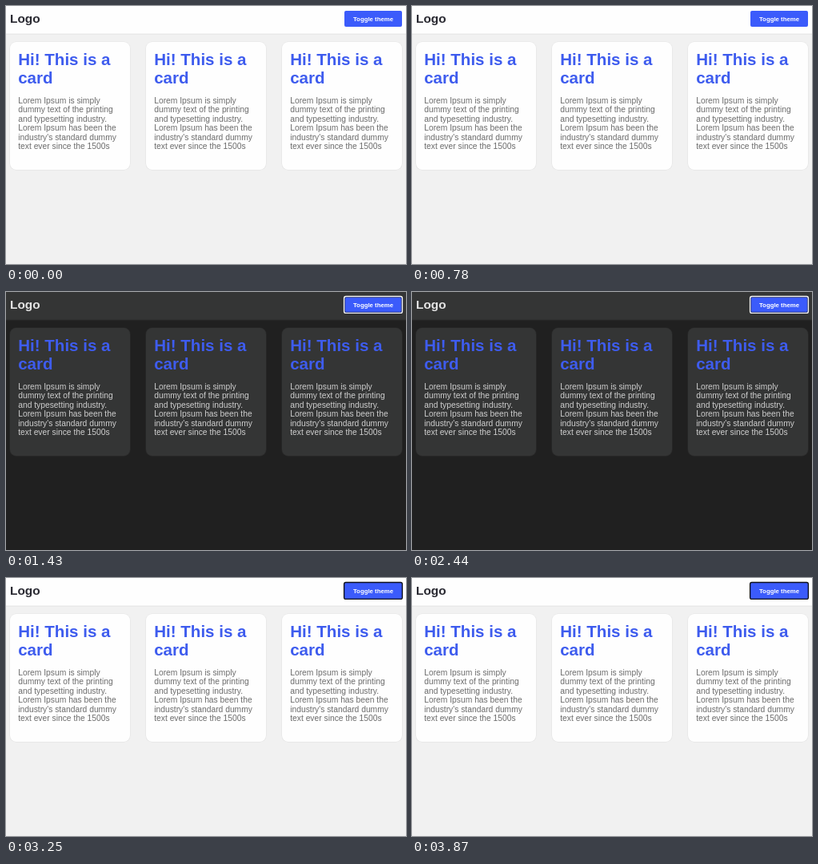
Recreate the animation shown at these times as an HTML page. Size 500 by 323 pixels, loop 4290 ms.

```html
<!DOCTYPE html>
<html lang="en">
<head>
<meta charset="utf-8">
<title>Theme toggle</title>
<style>
  html, body { margin: 0; width: 100%; height: 100%; overflow: hidden; }
  svg {
    display: block; width: 100vw; height: 100vh;
    font-family: "Liberation Sans", Arial, sans-serif;
    --page: #f1f1f1; --panel: #fefefe; --edge: #e5e5e5;
    --logo: #2a2a32; --text: #6c6c6c; --ring: #10121c; --gap: #3b5bfb;
  }
  svg.idle { --ring: none; --gap: none; }
  svg.dark {
    --page: #202020; --panel: #343535; --edge: #2a2a2a;
    --logo: #e4e4e4; --text: #cfcfcf; --ring: #f4f4f4; --gap: #171a2c;
  }
  svg.fading { --page: #505050; --edge: #5a5a5a; }
  .page { fill: var(--page); }
  .panel { fill: var(--panel); }
  .edge { fill: var(--edge); }
  .logo { fill: var(--logo); font: bold 15.4px "Liberation Sans", Arial, sans-serif; }
  .title { fill: #3e5cee; font-size: 20.55px; font-weight: bold; }
  .body { fill: var(--text); font-size: 10.3px; }
  .button { fill: #3b5bfb; }
  .label { fill: #fff; font-size: 7.8px; font-weight: bold; text-anchor: middle; }
  .ring, .gap { fill: none; }
  .ring { stroke: var(--ring); stroke-width: 1.4; }
  .gap { stroke: var(--gap); stroke-width: .8; }
</style>
</head>
<body>
<svg id="stage" class="idle" viewBox="0 0 500 323">
  <defs>
    <g id="card">
      <rect class="edge" x="-.6" y="44.4" width="151.2" height="161.4" rx="8.5"/>
      <rect class="panel" y="45" width="150" height="160" rx="8"/>
      <g class="title">
        <text x="10.2" y="74">Hi! This is a</text>
        <text x="10.2" y="97.4">card</text>
      </g>
      <g class="body" id="copy"></g>
    </g>
  </defs>
  <rect class="page" width="500" height="323"/>
  <rect class="edge" width="500" height="35.6"/>
  <rect class="panel" width="500" height="34.6"/>
  <text class="logo" x="5" y="20.5">Logo</text>
  <rect class="button" x="423" y="6" width="72" height="20" rx="2"/>
  <rect class="gap" x="423.6" y="6.6" width="70.8" height="18.8" rx="1.6"/>
  <rect class="ring" x="422.6" y="5.5" width="72.8" height="20.9" rx="2.2"/>
  <text class="label" x="459" y="18.7">Toggle theme</text>
  <use href="#card" x="5"/>
  <use href="#card" x="175"/>
  <use href="#card" x="345"/>
</svg>
<script>
  const stage = document.getElementById("stage");
  const copy = document.getElementById("copy");
  const lines = [
    "Lorem Ipsum is simply", "dummy text of the printing", "and typesetting industry.",
    "Lorem Ipsum has been the", "industry's standard dummy", "text ever since the 1500s"
  ];
  copy.innerHTML = lines
    .map((line, i) => `<text x="10.2" y="${121.6 + i * 11.53}">${line}</text>`)
    .join("");

  // Each state lasts until the given time in ms.
  const states = [[1300, "idle"], [1430, "light"], [3120, "dark"], [3250, "fading"], [4290, "light"]];
  const start = performance.now();

  function draw() {
    const time = (performance.now() - start) % 4290;
    const state = states.find(([end]) => time < end)[1];
    stage.setAttribute("class", state);
    requestAnimationFrame(draw);
  }
  draw();
</script>
</body>
</html>
```
